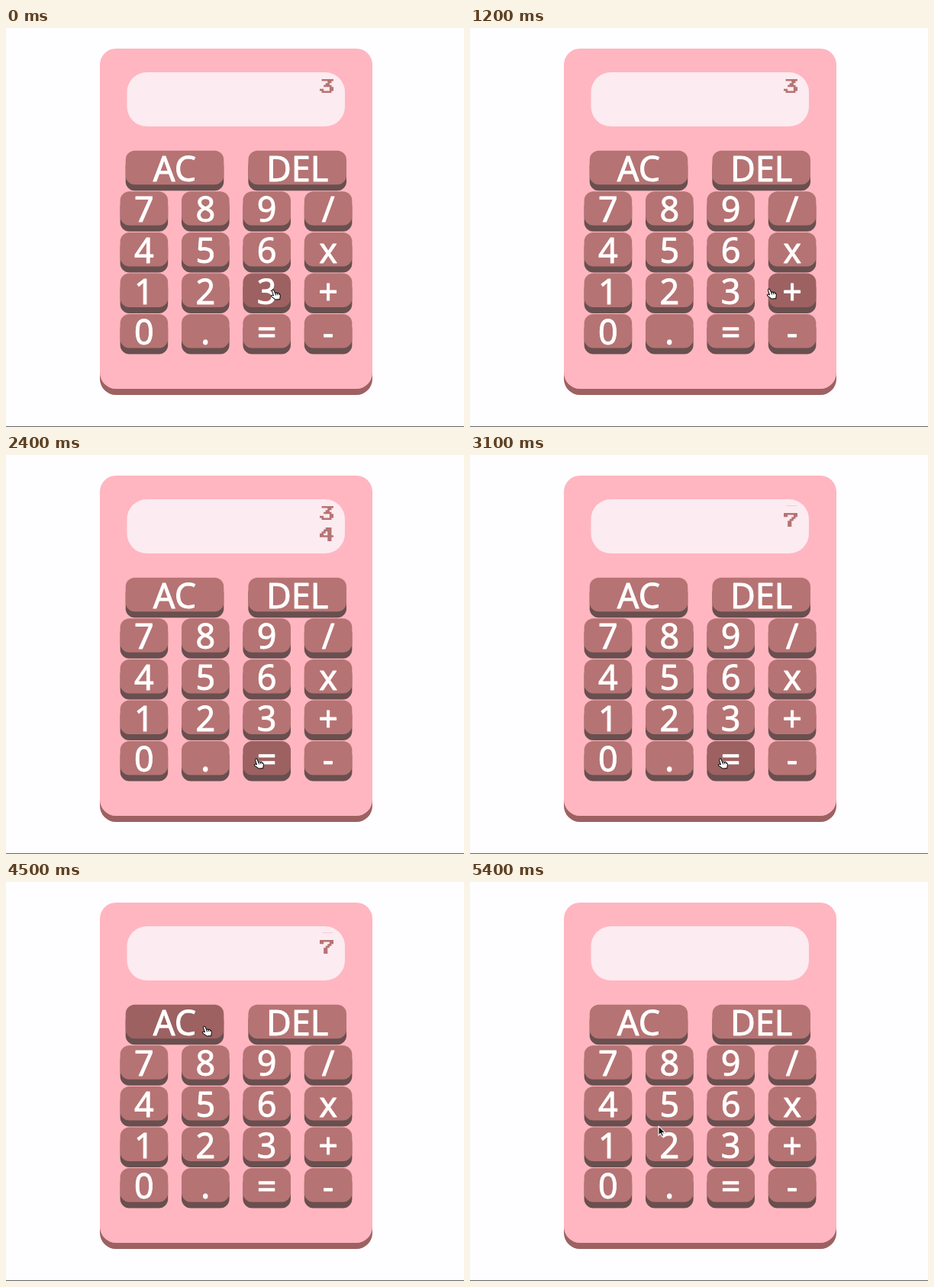
Recreate the animation shown at these times as an HTML page with a canvas. Size 600 by 523 pixels, loop 5.5 s.

```html
<!DOCTYPE html>
<html lang="en">
<head>
<meta charset="utf-8">
<title>Calculator</title>
<style>
  html, body { margin: 0; width: 100%; height: 100%; overflow: hidden; background: #fefdff; }
  canvas { display: block; }
</style>
</head>
<body>
<canvas id="stage" width="600" height="523"></canvas>
<script>
const ctx = document.getElementById('stage').getContext('2d');
const LOOP = 5500, STEP = 100, FACE = 44.5;

const keys = ['AC', 'DEL'].map((label, i) => ({ label, x: 156.7 + i * 160.7, y: 160.7, w: 128.6 }));
[...'789/456x123+0.=-'].forEach((label, i) => keys.push({
  label, x: 149.6 + (i % 4) * 80.4, y: 214.3 + Math.floor(i / 4) * 53.6, w: 62.6
}));

// Pointer glides: leave time, arrival time, tip position
const start = [350, 343];
const glides = [
  [200, 300, 392, 342],
  [1200, 1700, 184, 282],
  [1900, 2400, 328, 398],
  [3500, 3900, 361, 317],
  [3900, 4100, 344, 245],
  [4100, 4500, 260, 189],
  [4900, 5400, 247, 320]
];

const digits = {
  3: new Path2D('M1 0h6v1h-1v1h-1v1h1v1h1v2h-1v1h-5v-1h-1v-1h2v1h3v-2h-3v-1h1v-1h1v-1h-3z'),
  4: new Path2D('M3 0h3v4h1v1h-1v2h-2v-2h-4v-2h1v-1h1v-1h1z M4 2v2h-2v-1h1v-1z'),
  7: new Path2D('M0 0h7v2h-1v1h-1v1h-1v3h-2v-3h1v-1h1v-1h1v-1h-3v1h-2z')
};
const hand = new Path2D('M-1.8 1.8Q-1.5-.8 .8 .6L3 5.2 5 4.5 6 5.3 8 5 9 6.2' +
  'Q11 6.5 10.8 9L10 14.5 3.8 15-2.5 10.5Q-4 8.2-1.5 8.3L.6 9z');
const arrow = new Path2D('M0 0v14l3-3 2 4.5 2.5-1-2-4.5h4.5z');

function pointerAt(t) {
  let [x, y] = start;
  for (const [leave, arrive, toX, toY] of glides) {
    const p = Math.min(1, Math.max(0, (t - leave) / (arrive - leave)));
    const eased = p * (2 - p);
    x += (toX - x) * eased;
    y += (toY - y) * eased;
  }
  return [x, y];
}

const keyAt = (x, y) => keys.find(k => x > k.x && x < k.x + k.w && y > k.y && y < k.y + FACE);

function box(x, y, w, h, r, color) {
  ctx.fillStyle = color;
  ctx.beginPath();
  ctx.roundRect(x, y, w, h, r);
  ctx.fill();
}

function raised(x, y, w, h, r, color, shade) {
  box(x, y + 8, w, h, r, shade);
  box(x, y, w, h, r, color);
}

function drawDigit(digit, y) {
  ctx.save();
  ctx.translate(411, y);
  ctx.scale(18 / 7, 18 / 7);
  ctx.fillStyle = '#b67373';
  ctx.fill(digits[digit], 'evenodd');
  ctx.restore();
}

function drawDisplay(t) {
  box(158.5, 58, 285.5, 71, 26, '#fcebf0');
  if (t < 3000) drawDigit(3, 67);
  if (t >= 1800 && t < 3000) drawDigit(4, 95);
  if (t >= 3000 && t < 4700) {
    box(414, 66, 14, 1, 0, '#ead0d5');
    drawDigit(7, 76);
  }
}

function drawKey({ label, x, y, w }, active) {
  raised(x, y, w, FACE, 12, active ? '#9d6161' : '#b67373', '#694f4f');
  ctx.fillStyle = ctx.strokeStyle = '#fff';
  ctx.lineWidth = .9;
  ctx.fillText(label, x + w / 2, y + 40);
  ctx.strokeText(label, x + w / 2, y + 40);
}

function drawPointer(x, y, isHand) {
  const shape = isHand ? hand : arrow;
  ctx.save();
  ctx.translate(x, y);
  ctx.scale(.87, .87);
  ctx.lineWidth = 1.2;
  ctx.fillStyle = isHand ? '#fff' : '#111';
  ctx.strokeStyle = isHand ? '#111' : '#fff';
  ctx.fill(shape);
  ctx.stroke(shape);
  if (isHand) ctx.stroke(new Path2D('M3 5.2l1.2 3.3M6 5.3l.8 3M9 6.2l.3 2'));
  ctx.restore();
}

function draw(now) {
  const t = Math.floor(now % LOOP / STEP) * STEP;
  // Hover follows the pointer one step late
  const active = keyAt(...pointerAt(t - STEP));
  box(0, 0, 600, 523, 0, '#fefdff');
  box(0, 522, 600, 1, 0, '#666');
  raised(123, 27, 357, 446, 21, '#ffb6c1', '#9d6161');
  drawDisplay(t);
  ctx.font = '45px "Noto Sans", "Open Sans", sans-serif';
  ctx.textAlign = 'center';
  ctx.lineJoin = 'round';
  keys.forEach(key => drawKey(key, key === active));
  drawPointer(...pointerAt(t), Boolean(active));
  requestAnimationFrame(draw);
}

requestAnimationFrame(draw);
</script>
</body>
</html>
```
